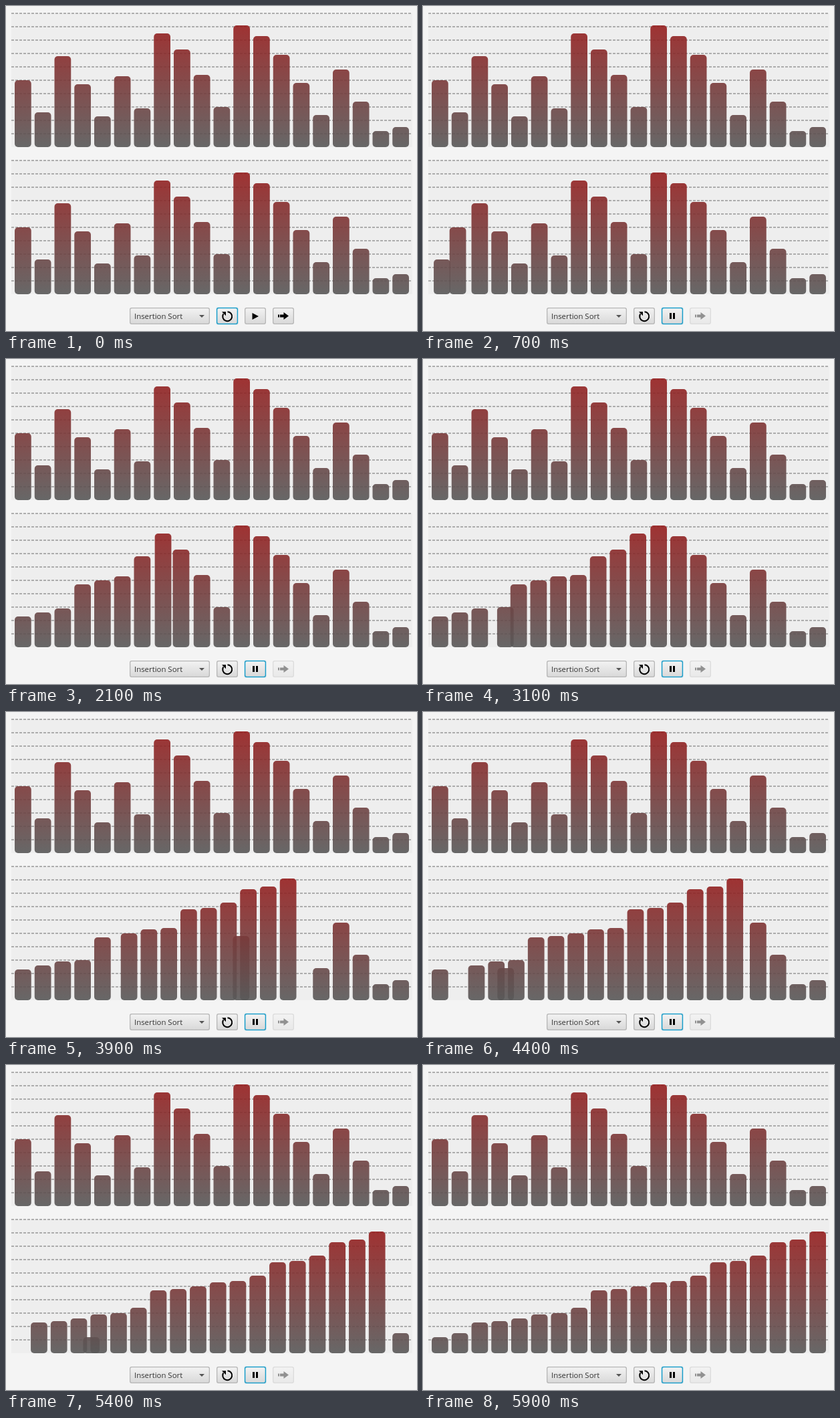
Write an HTML page that moves like this. It is 615x486 px and loops after 6900 ms.

```html
<!DOCTYPE html>
<html lang="en">
<head>
<meta charset="utf-8">
<title>Insertion Sort</title>
<style>
  html, body { margin: 0; width: 100%; height: 100%; overflow: hidden; background: #f4f4f4; }
  svg { display: block; width: 615px; height: 486px; }
  text { font: 11.4px "Open Sans", "Noto Sans", sans-serif; fill: #333; }
  .panel { fill: #eee; }
  .grid { stroke: #6c6c6c; stroke-width: 1; stroke-dasharray: 4 2; }
  .bar { fill: url(#heat); opacity: .9; }
  .edge { fill: #b6b6b6; }
  .face { fill: url(#face); }
  .halo, .ring { display: none; }
  .halo { fill: #039ed3; opacity: .16; }
  .ring { fill: #159cc9; }
  .focus .halo, .focus .ring { display: inline; }
  .off { opacity: .4; }
  .hidden { display: none; }
</style>
</head>
<body>
<svg viewBox="0 0 615 486">
  <defs>
    <linearGradient id="heat" gradientUnits="userSpaceOnUse" x1="0" y1="0" x2="0" y2="200">
      <stop offset="0" stop-color="#9c1818"/>
      <stop offset="1" stop-color="#585858"/>
    </linearGradient>
    <linearGradient id="face" x1="0" y1="0" x2="0" y2="1">
      <stop offset="0" stop-color="#f2f2f2"/>
      <stop offset="1" stop-color="#d9d9d9"/>
    </linearGradient>
  </defs>
  <g id="before" transform="translate(8 11)"></g>
  <g id="after" transform="translate(8 231)"></g>

  <g class="button" data-x="185" data-w="120">
    <text x="192" y="468">Insertion Sort</text>
    <path d="M289 462h8l-4 4z" fill="#555"/>
  </g>
  <g class="button" id="reset" data-x="315" data-w="32">
    <path d="M331.5 457.2A7 7 0 1 1 325.3 460.4" fill="none" stroke="#000" stroke-width="2"/>
    <path d="M323 457.2h6v6z"/>
  </g>
  <g class="button" id="play" data-x="357" data-w="32">
    <path id="go" d="M368.5 459v10l9.500-5z"/>
    <path id="pause" d="M369 459h3v9h-3zM374 459h3v9h-3z"/>
  </g>
  <g class="button" id="step" data-x="399" data-w="32">
    <path d="M407 461.500h2v4h-2zM410 461.500h5.500v-3.500l7.500 5.500l-7.500 5.500v-3.500h-5.500z"/>
  </g>
</svg>
<script>
const LOOP = 6900, TICK = 100, PITCH = 29.75, WIDTH = 24.75;
const heights = [100, 52, 136, 94, 46, 106, 58, 170, 146, 108,
                 60, 182, 166, 138, 96, 48, 116, 68, 24, 30];
// start of each insertion that moves something, then the end of the last
const starts = [395, 735, 1077, 1412, 1748, 2083, 2440, 2800, 3113,
                3450, 3788, 4121, 4455, 4788, 5125, 5465, 5810];
const $ = id => document.getElementById(id);

function make(name, attrs) {
  const el = document.createElementNS("http://www.w3.org/2000/svg", name);
  for (const key in attrs) el.setAttribute(key, attrs[key]);
  return el;
}

const slotX = slot => 5 + slot * PITCH;

function buildChart(group) {
  group.append(make("rect", { class: "panel", width: 600, height: 200 }));
  for (let y = 0; y < 200; y += 20)
    group.append(make("line", { class: "grid", x2: 599, y1: y, y2: y }));
  return heights.map((h, i) => {
    const bar = make("rect", { class: "bar", x: slotX(i), y: 200 - h, width: WIDTH, height: h, rx: 5 });
    group.append(bar);
    return bar;
  });
}

function buildButton(group) {
  const x = +group.dataset.x, w = +group.dataset.w;
  const box = (name, grow, rx) => make("rect", {
    class: name, x: x - grow, y: 451 - grow, width: w + 2 * grow, height: 25 + 2 * grow, rx
  });
  group.prepend(box("halo", 1, 4), box("edge", 0, 3), box("ring", 0, 3), box("face", -1.3, 2));
}

// Slot of every bar after each insertion that changes the order
function sortStates() {
  const order = heights.map((_, i) => i);
  const slots = () => heights.map((_, i) => order.indexOf(i));
  const states = [slots()];
  for (let i = 1; i < order.length; i++) {
    let to = i;
    while (to > 0 && heights[order[to - 1]] > heights[order[i]]) to--;
    if (to === i) continue;
    order.splice(to, 0, order.splice(i, 1)[0]);
    states.push(slots());
  }
  return states;
}

buildChart($("before"));
const bars = buildChart($("after"));
document.querySelectorAll(".button").forEach(buildButton);
const states = sortStates();

function draw(time) {
  const t = Math.floor(time / TICK) * TICK;
  let move = 0;
  while (move < starts.length - 2 && t >= starts[move + 1]) move++;
  const raw = (t - starts[move]) / (starts[move + 1] - starts[move]);
  const p = Math.min(1, Math.max(0, raw));
  bars.forEach((bar, i) => {
    const from = states[move][i], to = states[move + 1][i];
    bar.setAttribute("x", slotX(from + (to - from) * p));
  });

  const pressed = t >= 100, running = t >= 200;
  $("reset").classList.toggle("focus", !pressed);
  $("play").classList.toggle("focus", pressed);
  $("step").classList.toggle("off", running);
  $("go").classList.toggle("hidden", running);
  $("pause").classList.toggle("hidden", !running);
}

const origin = performance.now();
function frame() {
  draw((performance.now() - origin) % LOOP);
  requestAnimationFrame(frame);
}
frame();
</script>
</body>
</html>
```
